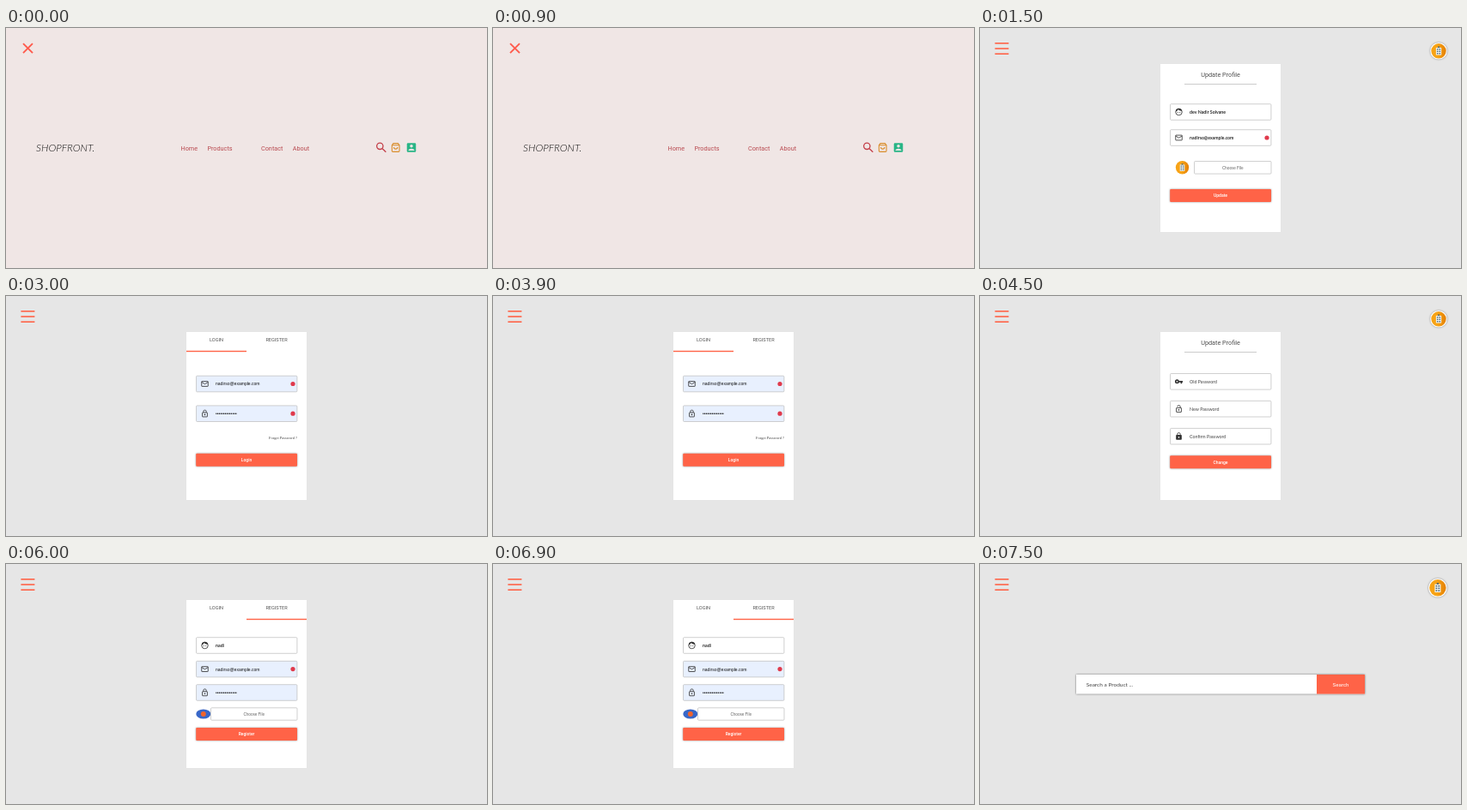
An HTML page for the animation above (8 s loop, 560 by 280 pixels).

```html
<!DOCTYPE html>
<html lang="en">
<head>
<meta charset="utf-8">
<title>Shop screens</title>
<style>
  html, body { margin: 0; width: 100%; height: 100%; overflow: hidden; background: #e6e6e6; }
  svg { display: block; }
  #stage { width: 560px; height: 280px; }
  text { font-family: Roboto, sans-serif; }
  .hand { font-family: Lato, sans-serif; }
  .plain { font-family: "Liberation Sans", sans-serif; }
  .serif { font-family: "Liberation Serif", serif; }
  .brand { font-family: Lato, sans-serif; font-weight: 300; font-style: italic; }
  .line { fill: none; stroke: currentColor; stroke-width: 2; }
  .solid { fill: currentColor; }
  .raised { filter: drop-shadow(0 .7px 1.2px rgba(0, 0, 0, .4)); }
  .scene { visibility: hidden; animation: show 8s step-end infinite; }
  .scene.base { visibility: visible; animation: none; }
  @keyframes show {
    0% { visibility: visible; }
    18.75%, 100% { visibility: hidden; }
  }
</style>
</head>
<body>
<svg id="stage" viewBox="0 0 560 280">
  <defs>
    <linearGradient id="amber" x1="0" x2="1">
      <stop offset=".45" stop-color="#f7a316"/>
      <stop offset="1" stop-color="#e37f05"/>
    </linearGradient>
    <symbol id="face" viewBox="0 0 24 24">
      <circle class="line" cx="12" cy="12" r="9"/>
      <path class="solid" d="M3 11Q8 10 10 5Q14 10 21 9L19 5Q12 -1 5 5Z"/>
      <circle class="solid" cx="9" cy="13" r="1.3"/>
      <circle class="solid" cx="15" cy="13" r="1.3"/>
    </symbol>
    <symbol id="mail" viewBox="0 0 24 24">
      <rect class="line" x="3" y="5" width="18" height="14" rx="1"/>
      <path class="line" d="M3 7L12 12.5L21 7"/>
    </symbol>
    <symbol id="lock" viewBox="0 0 24 24">
      <rect class="line" x="5" y="9" width="14" height="12" rx="1"/>
      <path class="line" d="M8 9V6a4 4 0 0 1 8 0V9"/>
      <circle class="solid" cx="12" cy="15" r="2"/>
    </symbol>
    <symbol id="unlock" viewBox="0 0 24 24">
      <rect class="line" x="5" y="9" width="14" height="12" rx="1"/>
      <path class="line" d="M8 6a4 4 0 0 1 8 0V9"/>
      <circle class="solid" cx="12" cy="15" r="2"/>
    </symbol>
    <symbol id="locked" viewBox="0 0 24 24">
      <rect class="solid" x="4" y="8" width="16" height="14" rx="2"/>
      <path class="line" d="M8 9V6a4 4 0 0 1 8 0V9"/>
      <circle cx="12" cy="15" r="2" fill="#fff"/>
    </symbol>
    <symbol id="key" viewBox="0 0 24 24">
      <circle cx="7" cy="12" r="4" fill="none" stroke="currentColor" stroke-width="4"/>
      <path class="solid" d="M12 10H23V14H21V18H17V14H12Z"/>
    </symbol>
    <symbol id="search" viewBox="0 0 24 24">
      <circle class="line" cx="9.5" cy="9.5" r="5.5"/>
      <path class="line" d="M13.8 13.8L20 20"/>
    </symbol>
    <symbol id="bag" viewBox="0 0 24 24">
      <path class="line" d="M4 7L7 3H17L20 7V19a2 2 0 0 1 -2 2H6a2 2 0 0 1 -2 -2ZM4 7H20M8 11a4 4 0 0 0 8 0"/>
    </symbol>
    <symbol id="account" viewBox="0 0 24 24">
      <rect class="solid" x="3" y="3" width="18" height="18" rx="2"/>
      <circle cx="12" cy="9" r="3" fill="#f0e6e5"/>
      <path d="M6 18V17Q7 14 12 14T18 17V18Z" fill="#f0e6e5"/>
    </symbol>
  </defs>
</svg>
<script>
const TOMATO = '#ff6347', INK = '#222', GRAY = '#555', AUTOFILL = '#e8f0fe';
const EMAIL = 'nadirso@example.com', DOTS = '•'.repeat(14);

const rect = (x, y, w, h, fill, extra = '') =>
  `<rect x="${x}" y="${y}" width="${w}" height="${h}" fill="${fill}" ${extra}/>`;
const circle = (x, y, r, fill, extra = '') =>
  `<circle cx="${x}" cy="${y}" r="${r}" fill="${fill}" ${extra}/>`;
const text = (x, y, str, size, fill, cls = '', extra = '') =>
  `<text x="${x}" y="${y}" font-size="${size}" fill="${fill}" class="${cls}" ${extra}>${str}</text>`;
const centered = (x, y, str, size, fill, cls = '', extra = '') =>
  text(x, y, str, size, fill, cls, 'text-anchor="middle" ' + extra);
const icon = (id, x, y, size = 10, color = '#333') =>
  `<use href="#${id}" x="${x - size / 2}" y="${y - size / 2}" width="${size}" height="${size}" color="${color}"/>`;

const outlined = (x, y, w, h, fill = '#fff') =>
  rect(x, y, w, h, fill, 'rx="1" stroke="#bcbcbc" stroke-width=".7"');
const field = (y, id, str, { cls = 'hand', size = 5.3, fill = '#fff', color = '#111', weight = 400 } = {}) =>
  outlined(221.5, y - 9.3, 117.4, 18.6, fill) + icon(id, 231.5, y) +
  text(244, y + 1.9, str, size, color, cls, `font-weight="${weight}"`);
const filled = { cls: 'plain', size: 5.04, fill: AUTOFILL };
const typed = { size: 5.3, weight: 600 };
const hint = { color: '#444' };
const badge = y => circle(334, y, 2.6, '#e03a4c');
const button = (y, str) =>
  rect(221.2, y, 117.8, 15, TOMATO, 'rx="1" class="raised"') +
  centered(280, y + 9.3, str, 5.04, '#fff', '', 'font-weight="500"');
const filePicker = (x, y, h) =>
  outlined(x, y - h / 2, 339 - x, h) + centered((x + 339) / 2, y + 1.7, 'Choose File', 4.8, '#666', 'hand');

const menu = [17.8, 24, 30.2].map(y => rect(17.4, y - .8, 16, 1.6, TOMATO)).join('');
const page = rect(0, 0, 560, 280, '#e6e6e6') + menu;
const card = page + rect(210, 42, 140, 196, '#fff');
const profileCard = card + centered(280, 56.7, 'Update Profile', 7.28, '#4d4d4d') +
  rect(238, 65.2, 84, .7, '#b5b5b5');
const authCard = tabX => card +
  centered(245, 52.7, 'LOGIN', 5.6, GRAY) + centered(315, 52.7, 'REGISTER', 5.6, GRAY) +
  rect(tabX, 63.8, 70, 1.4, TOMATO);

function avatar(x, y, r) {
  let windows = '';
  for (let i = 0; i < 6; i++)
    windows += rect(-.24 + (i % 2) * .3, -.3 + (i >> 1) * .28, .18, .16, '#4a6575');
  return `<g transform="translate(${x} ${y}) scale(${r})">` + circle(0, 0, 1, 'url(#amber)') +
    rect(-.36, -.44, .72, .98, '#f1f4f2') + rect(-.12, -.6, .24, .18, '#4a6575') + windows + '</g>';
}
const floating = (x, y, r) =>
  `<g class="raised">${circle(x, y, r, '#fff')}</g>` + avatar(x, y, r - 1.1);

const nav = [[203.5, 'Home'], [234.4, 'Products'], [297, 'Contact'], [333.7, 'About']]
  .map(([x, str]) => text(x, 143, str, 7.28, '#b94a50')).join('');

const home = rect(0, 0, 560, 280, '#f0e6e5') +
  `<path d="M20 18.2L31 29.2M31 18.2L20 29.2" stroke="#ff5b4d" stroke-width="1.9"/>` +
  text(35, 143.8, 'SHOPFRONT.', 12, '#111', 'brand') + nav +
  icon('search', 437, 139.5, 16, '#c4404a') + icon('bag', 453.7, 139.5, 13, '#d98d2b') +
  icon('account', 472, 139.5, 14, '#29b586');

const profile = profileCard + floating(534, 26.8, 9.8) +
  field(98, 'face', 'dev Nadir Solvane', typed) +
  field(128, 'mail', EMAIL, { size: 5.2, weight: 600 }) + badge(128) +
  avatar(235.5, 162.8, 7.7) + filePicker(249.5, 162.8, 14.6) + button(188, 'Update');

const login = authCard(210) +
  field(102.5, 'mail', EMAIL, filled) + badge(102.5) +
  field(137.2, 'lock', DOTS, filled) + badge(137.2) +
  text(339, 167, 'Forget Password ?', 4.48, '#444', 'serif', 'text-anchor="end"') + button(183.7, 'Login');

const password = profileCard + floating(534, 26.8, 9.8) +
  field(99.8, 'key', 'Old Password', hint) + field(131.7, 'unlock', 'New Password', hint) +
  field(163.7, 'locked', 'Confirm Password', hint) + button(186.3, 'Change');

const register = authCard(280) +
  field(95, 'face', 'nadi', typed) +
  field(122.6, 'mail', EMAIL, filled) + badge(122.6) + field(150, 'lock', DOTS, filled) +
  `<ellipse cx="229.8" cy="175" rx="8.5" ry="5.6" fill="#3867c8"/>` + circle(229.8, 175, 3, '#f0642d') +
  filePicker(238.5, 175, 14.4) + button(191, 'Register');

const search = page + floating(532.9, 27.8, 10.8) +
  rect(112, 129, 336, 22.6, '#fff', 'style="filter:drop-shadow(0 0 1px rgba(0,0,0,.55))"') +
  rect(392, 129, 56, 22.6, TOMATO) +
  text(123.7, 142.7, 'Search a Product ...', 6.5, '#444', 'hand') +
  centered(420, 142.6, 'Search', 6.16, '#fff');

// The last screen lies beneath the others and shows once they have all gone.
const timed = [home, profile, login, password, register];
document.getElementById('stage').insertAdjacentHTML('beforeend',
  `<g class="scene base">${search}</g>` +
  timed.map((body, i) =>
    `<g class="scene" style="animation-delay:${i ? i * 1.5 - 8 : 0}s">${body}</g>`).join(''));
</script>
</body>
</html>
```
